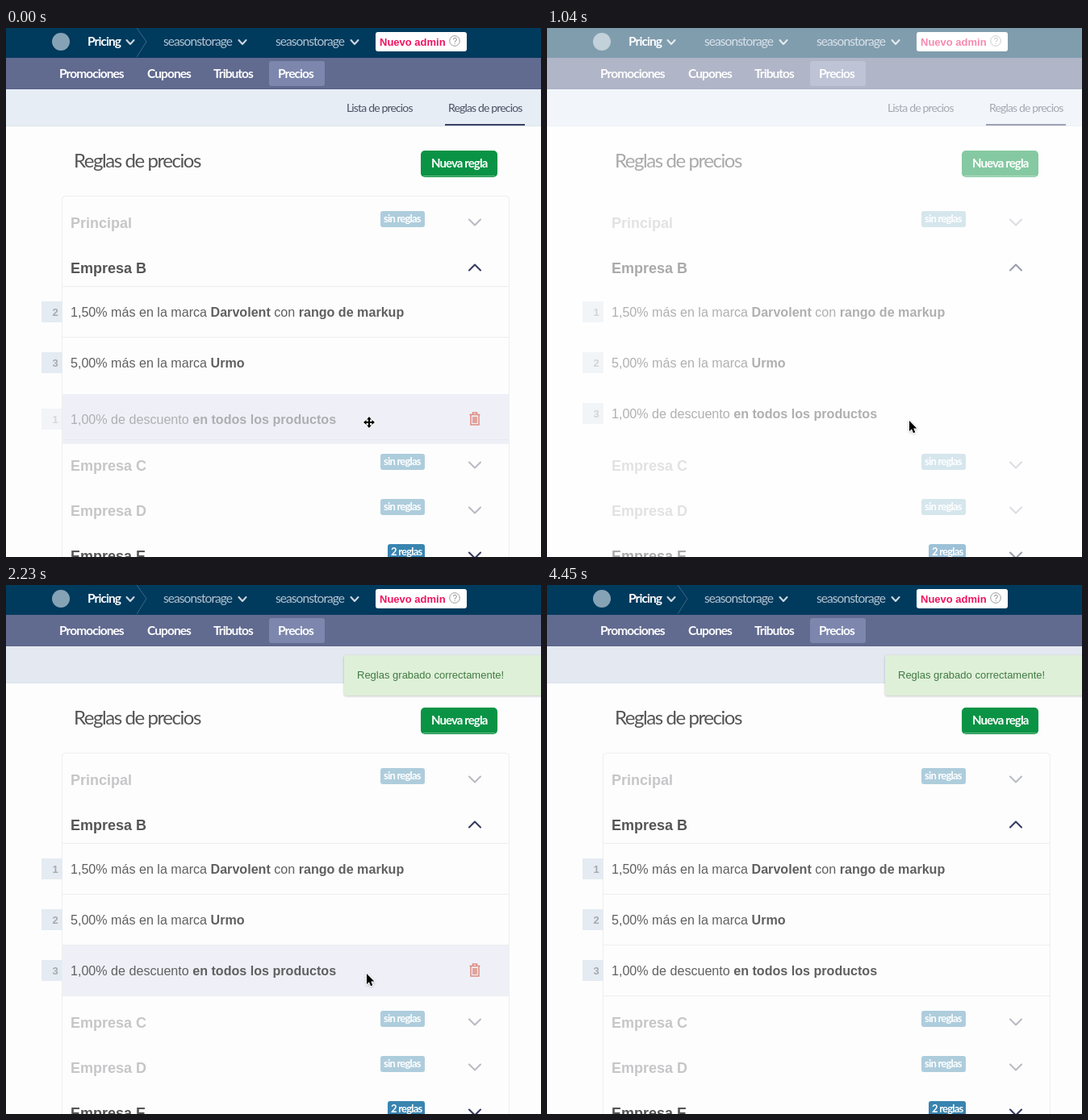
Recreate the animation shown at these times as an HTML page. Size 663 px wide and 656 px high, loop 6040 ms.

```html
<!DOCTYPE html>
<html lang="es">
<head>
<meta charset="utf-8">
<title>Reglas de precios</title>
<style>
  html, body { margin: 0; width: 100%; height: 100%; overflow: hidden; background: #fdfdfd; }
  svg { display: block; }
  text { font: 16.1px "Liberation Sans", Arial, sans-serif; fill: #606060; white-space: pre; }
  .narrow { font-family: Lato, sans-serif; font-size: 15.5px; letter-spacing: -.06em; }
  .nav { fill: #fff; font-weight: bold; }
  .store { fill: #b3c5d2; }
  .tab { font-size: 14px; fill: #4b5163; }
  .group { font-size: 18px; font-weight: bold; }
  .tag { font-size: 13px; font-weight: bold; fill: #fff; }
  .number { font-size: 13px; font-weight: bold; fill: #a6a9ae; text-anchor: middle; }
  .bold { font-weight: bold; }
  .chevron { fill: none; stroke-width: 2.1; stroke-linecap: round; stroke-linejoin: round; }
  .line { stroke: #eeeeef; fill: none; }
  .raised { filter: drop-shadow(0 1px 1.5px rgba(0, 0, 0, .22)); }
</style>
</head>
<body>
<svg id="stage" width="663" height="656" viewBox="0 0 663 656"></svg>
<script>
const LOOP = 6040;
const stage = document.getElementById('stage');

const text = (x, y, cls, content, extra = '') =>
  `<text x="${x}" y="${y}" class="${cls}" ${extra}>${content}</text>`;
const rect = (x, y, w, h, fill, extra = '') =>
  `<rect x="${x}" y="${y}" width="${w}" height="${h}" fill="${fill}" ${extra}/>`;
const chevron = (x, y, w, h, color) =>
  `<path class="chevron" stroke="${color}" d="M${x - w} ${y - h / 2}l${w} ${h}l${w} ${-h}"/>`;
const bold = content => `<tspan class="bold">${content}</tspan>`;

function group(name, y, tag, open) {
  const color = open ? '#555' : '#c6c6c8';
  const x = tag === '2 reglas' ? 473 : 464;
  const badge = tag
    ? rect(x, y - 21, 519 - x, 20, open ? '#3984b0' : '#aecddc', 'rx="3"') +
      text(x + 4, y - 7, 'narrow tag', tag)
    : '';
  return text(80, y, 'group', name, `style="fill:${color}"`) + badge +
    chevron(581, y - 7, 7, tag ? 7 : -7, open ? '#343a5c' : '#b9bac3');
}

const row = (i, content) => `<g id="row${i}">
  ${rect(44, 339, 26, 26, '#e5ebf2')}
  ${text(61, 357, 'number', i, `id="number${i}"`)}
  ${text(80, 358, '', content)}
</g>`;

stage.innerHTML = `
  ${rect(0, 0, 663, 656, '#fdfdfd')}
  ${rect(0, 0, 663, 37, '#003a5d')}
  ${rect(0, 0, 0, 37, '#1d5d7f', 'id="headerTint"')}
  <path id="separator" d="M162 0L174 17L162 36" fill="none" stroke="#3a6885"/>
  <circle cx="68" cy="17" r="11" fill="#86a3b5"/>
  ${text(101, 22, 'narrow nav', 'Pricing')}
  ${text(195, 22, 'narrow store', 'seasonstorage')}
  ${text(334, 22, 'narrow store', 'seasonstorage')}
  ${[154, 293, 432].map(x => chevron(x, 17.5, 4.5, 5, '#c9d6df')).join('')}
  ${rect(458, 5, 113, 24, '#fff', 'rx="3"')}
  ${text(463, 22, 'bold', 'Nuevo admin', 'style="font-size:13px;fill:#f0135f"')}
  <circle cx="556" cy="16" r="6.3" fill="none" stroke="#9a9a9a"/>
  ${text(553.4, 19.5, '', '?', 'style="font-size:10px;fill:#8a8a8a"')}

  ${rect(0, 37, 663, 39, '#616a8f')}
  ${rect(0, 75, 663, 1, '#5a6389')}
  ${rect(326, 41, 69, 31, '#7d87ae', 'rx="3"')}
  ${text(66, 62, 'narrow nav', 'Promociones')}
  ${text(175, 62, 'narrow nav', 'Cupones')}
  ${text(257, 62, 'narrow nav', 'Tributos')}
  ${text(337, 62, 'narrow nav', 'Precios')}

  ${rect(0, 76, 663, 46, '#e6edf5', 'id="tabBar"')}
  ${rect(0, 121, 663, 1, '#dce4eb')}
  ${text(422, 104, 'narrow tab', 'Lista de precios')}
  ${text(548, 104, 'narrow tab', 'Reglas de precios')}
  ${rect(544, 119, 99, 2, '#3c4366')}

  ${text(84, 173, 'narrow', 'Reglas de precios', 'style="font-size:24px;fill:#555"')}
  ${rect(514, 152, 95, 33, '#0a9345', 'rx="5"')}
  <path d="M517 183.5H606" stroke="#69bd8b"/>
  ${text(527, 173, 'narrow bold', 'Nueva regla', 'style="font-size:15px;fill:#fff"')}

  <g id="lines" class="line">
    <rect x="69.5" y="208.5" width="554" height="460" rx="4"/>
    <path d="M70 320.5H623M70 383.5H623M70 509.5H623"/>
    <path id="lastLine" d="M70 446.5H623"/>
  </g>
  ${group('Principal', 248, 'sin reglas')}
  ${group('Empresa B', 304, '', true)}
  ${rect(70, 454, 553, 62, '#eff0f7', 'id="hover"')}
  <path id="dragLine" class="line" d="M70 510.5H623" style="stroke:#e7e8f0"/>
  ${row(1, `1,50% más en la marca ${bold('Darvolent')} con ${bold('rango de markup')}`)}
  ${row(2, `5,00% más en la marca ${bold('Urmo')}`)}
  ${row(3, `1,00% de descuento ${bold('en todos los productos')}`)}
  <path id="trash" d="M574.5 479.5h13M578.5 479v-2h5v2M576 480v12h10v-12M579 482v8M581 482v8M583 482v8"
    fill="none" stroke="#dc8a80" stroke-width="1.5"/>
  ${group('Empresa C', 549, 'sin reglas')}
  ${group('Empresa D', 605, 'sin reglas')}
  ${group('Empresa E', 661, '2 reglas', true)}

  <g id="toast">
    ${rect(419, 87, 250, 50, '#dff0d8', 'rx="3" class="raised"')}
    ${text(435, 116, '', 'Reglas grabado correctamente!', 'style="font-size:13px;fill:#3f7a42"')}
  </g>
  ${rect(0, 0, 663, 656, '#fff', 'id="veil"')}

  <path id="mover" transform="translate(450 489)" stroke="#fff" stroke-width="1.6" paint-order="stroke"
    d="M0-7l3 3.5h-2v2.5h2.5v-2l3.5 3l-3.5 3v-2h-2.5v2.5h2l-3 3.5l-3-3.5h2v-2.5h-2.5v2l-3.5-3l3.5-3v2h2.5v-2.5h-2z"/>
  <path id="arrow" class="raised" stroke="#fff" stroke-width="1.6" paint-order="stroke"
    d="M0 0V13L3 10.3L5 15.3L7.3 14.3L5.2 9.5H9.3Z"/>`;

// Step tracks: [start time, value...]
const veilSteps = [[0, 0], [290, .15], [440, .5], [2230, 0]];
const toastSteps = [[0, 0], [1780, .35], [1930, .75], [2080, 1]];
const tintSteps = [[0, 0], [1340, 55], [1490, 663], [1780, 0]];
const arrowSteps = [
  [0, 449, 487], [2230, 447, 482], [2380, 449, 482], [2520, 473, 492],
  [2670, 555, 533], [2820, 568, 540], [2970, 578, 533], [3120, 583, 535],
  [3270, 612, 601], [3410, 613, 610], [3560, 614, 610], [4010, 631, 632],
  [4160, 636, 641], [4310, 638, 652], [4450, 638, 700]
];
const stepAt = (steps, t) => steps.findLast(([start]) => start <= t).slice(1);

const el = id => document.getElementById(id);
const set = (id, name, value) => el(id).setAttribute(name, value);
const show = (id, visible) => set(id, 'visibility', visible ? 'visible' : 'hidden');

function draw(t) {
  const dragging = t < 140;
  const settling = t < 290;
  const hovered = t >= 2230 && t < 2670;
  const [veil] = stepAt(veilSteps, t);
  const [x, y] = stepAt(arrowSteps, t);

  [1, 2, 3].forEach(i => {
    const shift = (i - 1) * 63 + (i === 3 && dragging ? 7 : 0);
    set(`row${i}`, 'transform', `translate(0 ${shift})`);
    el(`number${i}`).textContent = dragging ? i % 3 + 1 : i;
  });
  set('row3', 'opacity', dragging ? .45 : 1);
  set('hover', 'y', settling ? 454 : 447);
  show('hover', settling || hovered);
  show('dragLine', settling);
  show('lastLine', !settling);
  show('trash', dragging || hovered);
  set('trash', 'transform', `translate(0 ${dragging ? 0 : -7})`);

  show('separator', t < 290 || (t >= 440 && t < 1040) || t >= 1780);
  set('headerTint', 'width', stepAt(tintSteps, t)[0]);
  set('tabBar', 'fill', t < 2230 ? '#e6edf5' : '#e3e8f1');
  set('lines', 'opacity', 1 - 2 * veil);
  set('veil', 'opacity', veil);
  set('toast', 'opacity', stepAt(toastSteps, t)[0]);

  show('mover', dragging);
  show('arrow', !dragging);
  set('arrow', 'transform', `translate(${x} ${y})`);
}

const origin = performance.now();
function tick() {
  draw((performance.now() - origin) % LOOP);
  requestAnimationFrame(tick);
}
tick();
</script>
</body>
</html>
```
